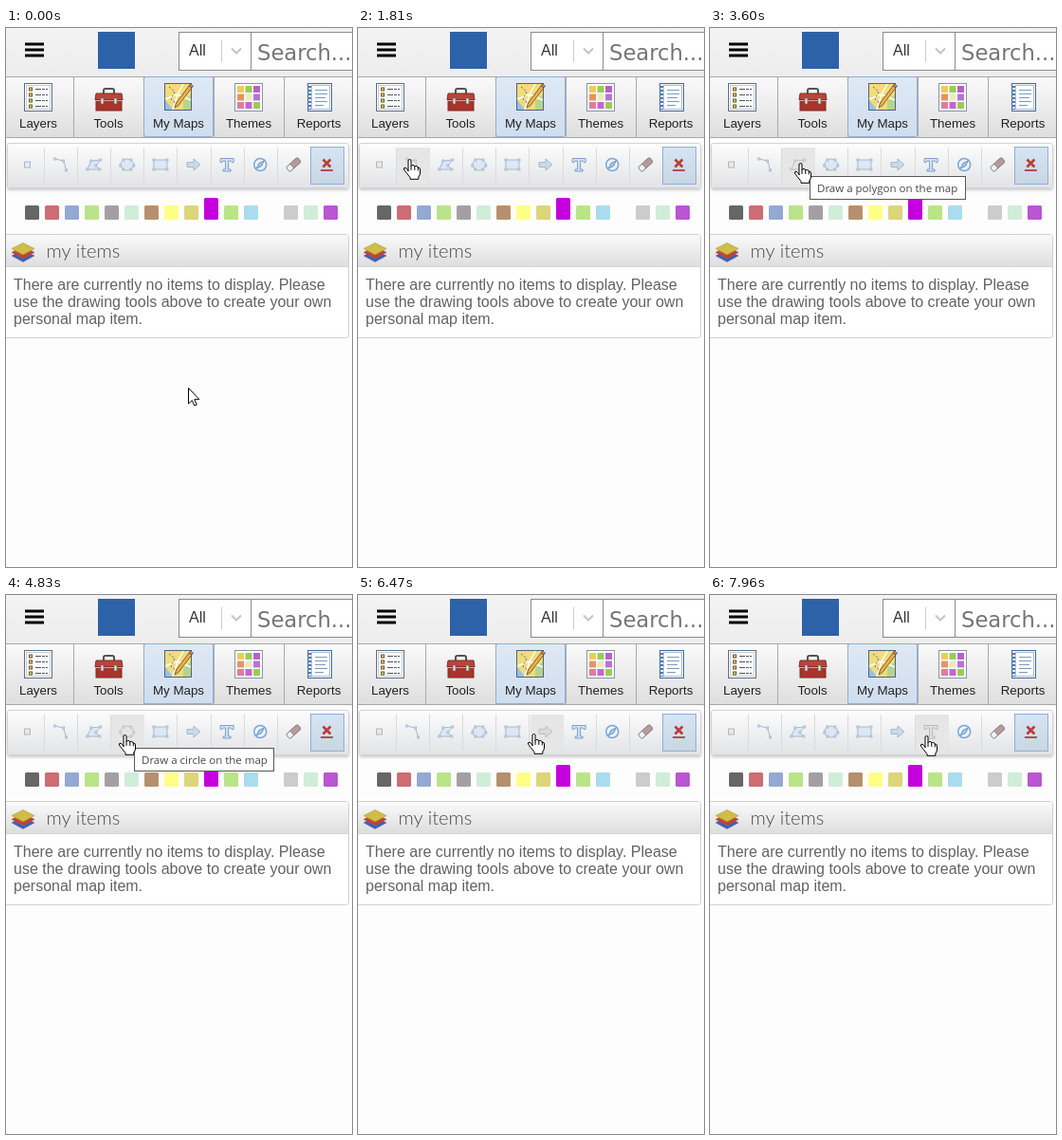
Recreate the animation shown at these times as an HTML page. Size 365 by 568 pixels, loop 8 s.

```html
<!DOCTYPE html>
<html lang="en">
<head>
<meta charset="utf-8">
<title>Drawing tools</title>
<style>
html, body { margin: 0; width: 100%; height: 100%; overflow: hidden; background: #fdfdfd; }
svg { display: block; width: 365px; height: 568px; font-family: "Liberation Sans", Arial, sans-serif; }
.tab { font-size: 13.33px; fill: #222; text-anchor: middle; }
.body { font-size: 16px; fill: #626262; }
.tip { font: 11.5px "Open Sans", "Noto Sans", sans-serif; fill: #484848; }
.tool { fill: none; stroke: #91abc9; }
</style>
</head>
<body>
<svg id="stage" viewBox="0 0 365 568">
  <defs>
    <linearGradient id="head" x2="0" y2="1"><stop stop-color="#f3f3f3"/><stop offset="1" stop-color="#ededed"/></linearGradient>
    <linearGradient id="tab" x2="0" y2="1"><stop stop-color="#fafafa"/><stop offset="1" stop-color="#dedede"/></linearGradient>
    <linearGradient id="active" x2="0" y2="1"><stop stop-color="#dfe9f5"/><stop offset="1" stop-color="#cfddef"/></linearGradient>
    <linearGradient id="bar" x2="0" y2="1"><stop stop-color="#fdfdfd"/><stop offset="1" stop-color="#e1e3e5"/></linearGradient>
    <linearGradient id="pressed" x2="0" y2="1"><stop stop-color="#d6e4f3"/><stop offset="1" stop-color="#c9d6e4"/></linearGradient>
    <filter id="shadow" x="-5%" y="-20%" width="110%" height="150%"><feDropShadow dx="0" dy="2" stdDeviation="1.8" flood-opacity=".2"/></filter>
  </defs>

  <rect width="365" height="568" fill="#fdfdfd"/>

  <g id="header">
    <rect width="365" height="51" fill="url(#head)"/>
    <path d="M20 17H40M20 23H40M20 29H40" stroke="#000" stroke-width="3"/>
    <rect x="97" y="4" width="39" height="39" fill="#2d62a8"/>
    <rect x="182.5" y="4.5" width="190" height="40" fill="#fff" stroke="#8a8a8a"/>
    <path d="M258.5 5V44" stroke="#8a8a8a"/>
    <path d="M227.5 13V36" stroke="#ccc"/>
    <path d="M238 21.5L243 26.5L248 21.5" fill="none" stroke="#c4c4c4" stroke-width="2"/>
    <text x="193" y="29" font-size="16" fill="#333">All</text>
    <text x="265" y="34" font-size="22.67" fill="#757575" font-family="'DejaVu Sans', Verdana, sans-serif">Search...</text>
  </g>

  <g id="tabs"></g>

  <g id="tabIcons">
    <g transform="translate(19 58)">
      <rect x=".5" y=".5" width="29" height="29" fill="#fff" stroke="#5d6c82"/>
      <rect x="2.5" y="2.5" width="25" height="25" fill="#f8fafc" stroke="#c3ccda"/>
      <path d="M12 6.5H25M12 12.5H25M12 18.5H25M12 24.5H25" stroke="#555" stroke-dasharray="6 1 3 1"/>
      <path d="M5 6.5H9M5 12.5H9M5 18.5H9M5 24.5H9" stroke="#6b5a30" stroke-width="4"/>
      <path d="M6 6.5H8M6 12.5H8M6 18.5H8M6 24.5H8" stroke="#f0c95a" stroke-width="2"/>
    </g>
    <g transform="translate(93 63)">
      <path d="M10 6V2.500Q10 1 12 1H19Q21 1 21 2.500V6" fill="none" stroke="#555" stroke-width="2"/>
      <path d="M2 6H29L30 13H1Z" fill="#b9453c" stroke="#7d2b25"/>
      <rect x="2" y="13" width="27" height="11" fill="#a9342c" stroke="#7d2b25"/>
      <path d="M1 13.500H30" stroke="#dfa49d"/>
      <path d="M7 11H10V17H7ZM21 11H24V17H21Z" fill="#ddd" stroke="#666" stroke-width=".7"/>
    </g>
    <g transform="translate(167 58)">
      <rect x=".5" y=".5" width="28" height="28" fill="#f1dc7c" stroke="#50627c"/>
      <path d="M1 18L9 28H1Z" fill="#8fc3e8"/>
      <path d="M20 28V19L28 12V28Z" fill="#b5d48c"/>
      <path d="M1 17L14 12L20 1M9 28L14 12L28 18" fill="none" stroke="#fff" stroke-width="1.500"/>
      <path d="M5 4L11 9L7 17L14 23" fill="none" stroke="#4a6594" stroke-dasharray="2 2"/>
      <path d="M11 26L12.500 21L26 3L29 5L15 23.500Z" fill="#ecb04a" stroke="#5f4a2a" stroke-width=".8"/>
      <path d="M26 3L27.500 1L30.500 3L29 5Z" fill="#d9807c" stroke="#5f4a2a" stroke-width=".7"/>
    </g>
    <g id="themeGrid" transform="translate(241 58)">
      <rect x=".5" y=".5" width="29" height="29" fill="#fff" stroke="#8793a6"/>
    </g>
    <g transform="translate(315 58)">
      <rect x="3.5" y=".5" width="25" height="29" fill="#eaf2fb" stroke="#47699a"/>
      <rect x="7.5" y="2.5" width="19" height="25" fill="#fff" stroke="#a9c0dc"/>
      <path d="M5 3V28" stroke="#4f79b3" stroke-width="4" stroke-dasharray="2 2"/>
      <path d="M11 7.500H24M11 11.500H24M11 15.500H22M11 19.500H24M11 23.500H20" stroke="#7f98ba"/>
    </g>
  </g>

  <g id="toolbar">
    <rect x="1.5" y="121.5" width="360" height="47" rx="2" fill="url(#bar)" stroke="#d2d4d6" filter="url(#shadow)"/>
    <g id="dividers" stroke="#d9dcdf"></g>
    <rect x="321.5" y="125.5" width="35" height="39" fill="url(#pressed)" stroke="#8fb0d6"/>
    <rect id="hover" y="126" width="35" height="36" rx="2" fill="#e6e6e6"/>
    <g id="tools"></g>
  </g>

  <g id="swatches"></g>

  <g id="items">
    <rect x="-3.5" y="217.5" width="365" height="109" rx="3" fill="#fff" stroke="#d0d0d0"/>
    <path d="M0 218H359Q361 218 361 220V251H0Z" fill="url(#tab)"/>
    <path d="M0 251.5H361" stroke="#d4d4d4"/>
    <g stroke-width=".6">
      <path d="M6 240L18 234L30 240L18 246.500Z" fill="#3c5fae" stroke="#5a74ab"/>
      <path d="M6 236.500L18 230L30 236.500L18 243Z" fill="#c2403a" stroke="#b05a55"/>
      <path d="M6 232.500L18 226.500L30 232.500L18 239Z" fill="#cfbe45" stroke="#a89c45"/>
    </g>
    <text x="42.500" y="242" font-size="20.2" font-weight="300" fill="#4a4a4a" font-family="Lato, sans-serif">my items</text>
    <text class="body" x="8" y="276">There are currently no items to display. Please</text>
    <text class="body" x="8" y="294">use the drawing tools above to create your own</text>
    <text class="body" x="8" y="312">personal map item.</text>
  </g>

  <g id="tooltip">
    <rect x=".5" y=".5" height="24" fill="#fff" stroke="#575757"/>
    <text class="tip" x="8" y="17"></text>
  </g>

  <path id="arrow" d="M.5 .5V17L4.300 13.400L6.800 19L9.200 18L6.800 12.300H11.800Z" fill="#fff" stroke="#000" stroke-linejoin="round"/>
  <g id="hand" stroke="#000" stroke-linejoin="round" stroke-linecap="round">
    <path d="M-2 13.500V3Q-2 1.500-.5 1.500T1 3V8.500Q1.500 7.500 3 7.500T5 9Q5.500 8.200 6.800 8.500T8.300 10.200Q10.500 9.800 10.500 12V16Q10.500 18 8.800 20V22.300H0V20.500Q-2 18-4 15.500Q-6.200 12.800-6.500 12Q-7 10-5 10.200Q-3.500 10.800-2 13.500Z" fill="#fff"/>
    <path d="M1 8.500V12.500M4.800 9V12.500M8.300 10.200V13" fill="none"/>
  </g>
</svg>

<script>
const LOOP = 8000, PITCH = 35.1;
const el = id => document.getElementById(id);
const add = (id, markup) => el(id).insertAdjacentHTML('beforeend', markup);
const place = (node, x, y) => node.setAttribute('transform', `translate(${x} ${y})`);
const show = (node, on) => node.setAttribute('visibility', on ? 'visible' : 'hidden');

['Layers', 'Tools', 'My Maps', 'Themes', 'Reports'].forEach((name, i) => {
  const x = i * 74 - 3, active = i === 2;
  add('tabs', `<rect x="${x + .5}" y="51.5" width="74" height="64" fill="url(#${active ? 'active' : 'tab'})" stroke="#a9a9a9"/>
    <text class="tab" x="${x + 37}" y="105">${name}</text>`);
});
add('tabs', '<rect x="145.5" y="51.5" width="73" height="63" rx="2" fill="none" stroke="#8faed3"/>');

['#f0c95a', '#9ccb55', '#b95fcf', '#e8935f', '#f1e6c0', '#b873d2', '#e07ba2', '#c366d0', '#9ccb55'].forEach((color, i) =>
  add('themeGrid', `<rect x="${3 + i % 3 * 8.500}" y="${3 + Math.floor(i / 3) * 8.500}" width="7" height="7" fill="${color}"/>`));

const node = (x, y) => `<rect x="${x - 1}" y="${y - 1}" width="2" height="2" fill="#e9f1fa" stroke-width=".9"/>`;
const shape = (markup, ...points) => markup + points.map(p => node(...p)).join('');
const corners = [[-7, -5], [7, -5], [7, 5], [-7, 5]];
const toolIcons = [
  '<rect x="-3" y="-3" width="6" height="6" fill="#dfeaf5"/>',
  shape('<path d="M-6 -6L3 -4L6 6"/>', [-6, -6], [3, -4], [6, 6]),
  shape('<path d="M-7 5L-3 -4L7 -5L2 1L6 5Z" fill="#d9e6f3"/>', [-7, 5], [-3, -4], [7, -5], [2, 1], [6, 5]),
  shape('<ellipse rx="7" ry="6" fill="#d9e6f3"/>', [-4, -5], [4, -5], [7, 1], [4, 5], [-4, 5], [-7, 1]),
  shape('<rect x="-7" y="-5" width="14" height="10" fill="#d9e6f3"/>', ...corners),
  '<path d="M-7 -2.500H0V-6L7 0L0 6V2.500H-7Z" fill="#c3d5e9"/>',
  '<path d="M-7 -6.500H7V-2.500H5L4 -4H1.500V5H4V7H-4V5H-1.500V-4H-4L-5 -2.500H-7Z" fill="#d4e2f2" stroke="#7c9fca"/>',
  '<circle r="6.500" fill="#edf4fb" stroke="#7fa6d1" stroke-width="1.500"/><path d="M4 -4L1.500 1.500L-4 4L-1.500 -1.500Z" fill="#a7c4e4" stroke="#6f98c8"/>',
  '<g transform="rotate(-42)" stroke="#8d8d8d"><rect x="-8" y="-3" width="16" height="6" rx="1.500" fill="#f2f2f2"/><path d="M-2 -3H6.500Q8 -3 8 -1.500V1.500Q8 3 6.500 3H-2Z" fill="#b99a98"/></g>',
  '<path d="M-4 -5.500L4 2.500M4 -5.500L-4 2.500" stroke="#bb3d35" stroke-width="2.600"/><path d="M-6.500 6H6.500" stroke="#a6534f" stroke-width="2"/>'
];
toolIcons.forEach((icon, i) => {
  const x = 22.500 + i * PITCH;
  add('tools', `<g class="tool" transform="translate(${x} 144)">${icon}</g>`);
  if (i) add('dividers', `<path d="M${Math.round(x - PITCH / 2) + .5} 126V164"/>`);
});

['#666666', '#cd6c74', '#94a9d2', '#b8e487', '#a49fa5', '#d0edd8', '#b6906c', '#ffff86', '#dcd579', '#c400dc',
  '#b8e585', '#a9dcef', '', '#cccccc', '#d0edd8', '#ba55d3'].forEach((color, i) => {
  const top = i === 9 ? 179 : 187;
  if (color) add('swatches', `<rect x="${20 + i * 21}" y="${top}" width="15" height="${202 - top}" rx="1.500" fill="${color}"/>`);
});

// Cursor moves: start, end, number of steps, end point, curve control point.
const start = [192, 379];
const moves = [
  [70, 720, 9, [23, 141], [-18, 72]],
  [1570, 1970, 6, [57, 141], [58, 130]],
  [2130, 2130, 1, [59, 139]],
  [2900, 3140, 4, [96, 141], [80, 136]],
  [3910, 4070, 3, [118, 148], [110, 130]],
  [4290, 4290, 1, [126, 146]],
  [5070, 5150, 2, [148, 147], [138, 131]],
  [5310, 5540, 4, [160, 145], [155, 147]],
  [6400, 6470, 2, [186, 145], [173, 134]],
  [6630, 6790, 3, [195, 144], [191, 145]],
  [7640, 7960, 5, [229, 147], [215, 139]]
];
const hints = [
  [1260, 1570, 149, 'a point'], [2590, 2900, 140, 'a line'], [3600, 3910, 165, 'a polygon'],
  [4830, 5070, 148, 'a circle'], [6080, 6400, 170, 'a rectangle'], [7250, 7640, 158, 'an arrow']
];

function cursorAt(t) {
  let from = start;
  for (const [t0, t1, steps, to, via = to] of moves) {
    if (t < t0) break;
    if (t < t1) {
      const step = 1 + Math.floor((t - t0) / (t1 - t0) * (steps - 1) + .01);
      const u = step / steps, p = u * u * (3 - 2 * u), q = 1 - p;
      return from.map((a, i) => Math.round(q * q * a + 2 * p * q * via[i] + p * p * to[i]));
    }
    from = to;
  }
  return from;
}

const tools = [...el('tools').children];
const tipBox = el('tooltip').querySelector('rect');
const tipText = el('tooltip').querySelector('text');

function render(t) {
  const [x, y] = cursorAt(t);
  const over = y > 125 && y < 165 ? Math.floor((x - 5.500) / PITCH) : -1;

  show(el('hand'), over >= 0);
  show(el('arrow'), over < 0);
  place(el('hand'), x, y);
  place(el('arrow'), x, y);

  show(el('hover'), over >= 0);
  el('hover').setAttribute('x', Math.round(6 + over * PITCH));
  tools.forEach((tool, i) => {
    const gray = i === over || (i === 0 && t >= 720);
    tool.style.filter = gray ? 'grayscale(1)' : 'none';
    tool.style.opacity = i === over ? .6 : i < 6 ? .8 : 1;
  });

  const hint = hints.find(([on, off]) => t >= on && t < off);
  show(el('tooltip'), hint);
  if (hint) {
    place(el('tooltip'), x + 9, y + 15);
    tipBox.setAttribute('width', hint[2] - 1);
    tipText.textContent = `Draw ${hint[3]} on the map`;
  }
}

const origin = performance.now();
function frame() {
  render((performance.now() - origin) % LOOP);
  requestAnimationFrame(frame);
}
frame();
</script>
</body>
</html>
```
